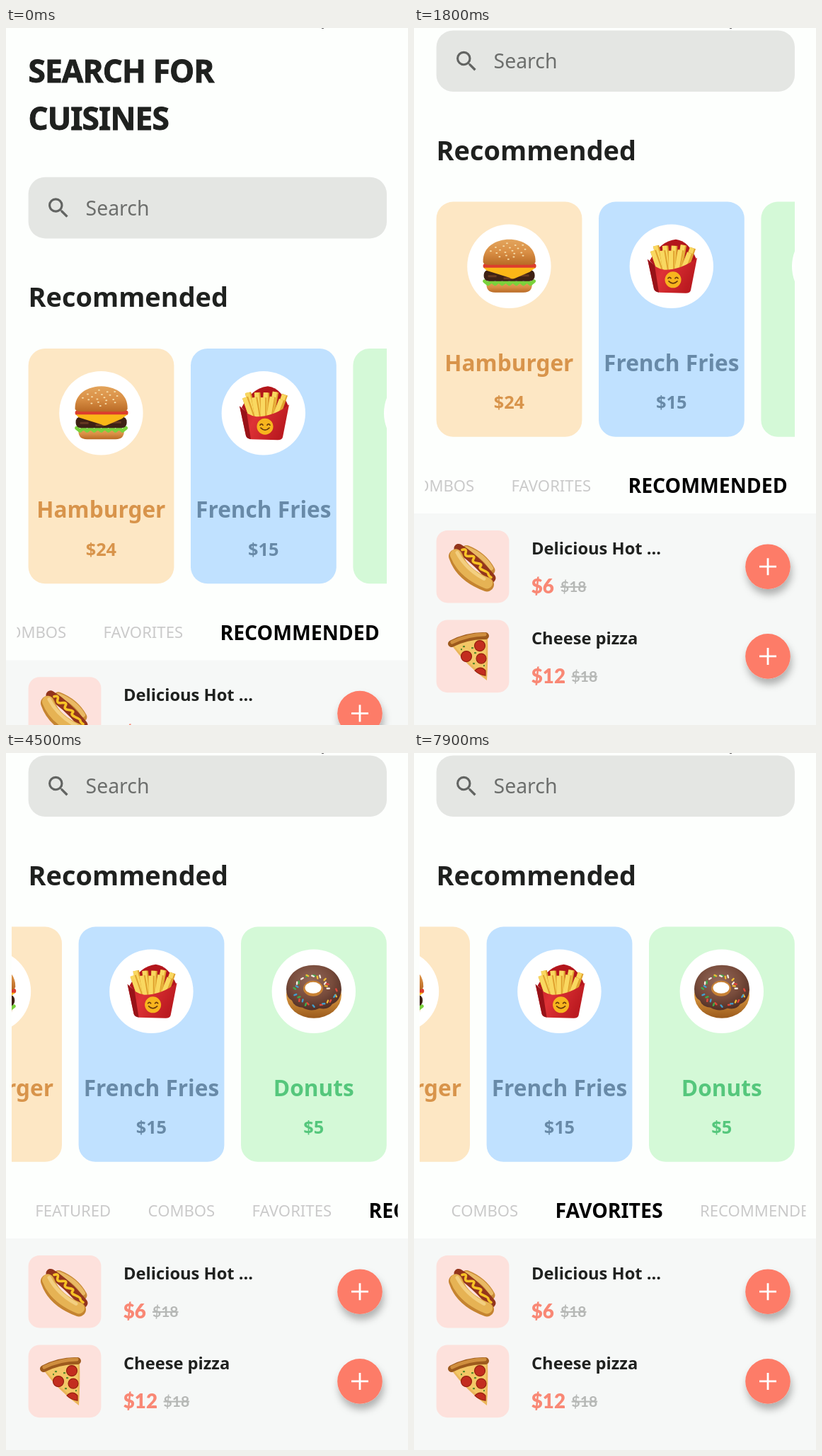
An HTML page that plays this animation: 568 by 985 pixels, repeating every 8000 ms.

```html
<!DOCTYPE html>
<html lang="en">
<head>
<meta charset="utf-8">
<title>Food menu</title>
<style>
  html, body { margin: 0; width: 100%; height: 100%; overflow: hidden; background: #fdfffd; }
  svg { display: block; width: 100%; height: 100%; }
  text { font-family: "Noto Sans", sans-serif; white-space: pre; }
  .bold { font-weight: 700; }
  .title { font-size: 44.2px; letter-spacing: -.85px; stroke: #1f211f; stroke-width: .9px; }
  .price { font-family: Lato, sans-serif; font-weight: 900; }
  .old { font-family: Lato, sans-serif; font-weight: 700; }
</style>
</head>
<body>
<svg id="stage" viewBox="0 0 568 985">
  <defs>
    <clipPath id="cardClip"><rect x="8" y="440" width="530" height="360"/></clipPath>
    <clipPath id="tabClip"><rect x="15.5" y="820" width="538" height="70"/></clipPath>
    <filter id="lift" x="-50%" y="-50%" width="200%" height="200%">
      <feDropShadow dx="2" dy="8" stdDeviation="5.5" flood-color="#000" flood-opacity=".29"/>
    </filter>
    <linearGradient id="bun" x2="0" y2="1">
      <stop offset="0" stop-color="#e3a45c"/><stop offset=".5" stop-color="#d98f45"/><stop offset="1" stop-color="#b96a25"/>
    </linearGradient>
    <linearGradient id="red" x2="1" y2=".4">
      <stop offset="0" stop-color="#c01c22"/><stop offset=".4" stop-color="#de3236"/><stop offset="1" stop-color="#bb1a20"/>
    </linearGradient>
    <radialGradient id="choc" cx=".45" cy=".35" r=".65">
      <stop offset="0" stop-color="#94695b"/><stop offset=".6" stop-color="#774b3b"/><stop offset="1" stop-color="#523026"/>
    </radialGradient>
    <linearGradient id="dough" x2="0" y2="1">
      <stop offset=".5" stop-color="#d9973f"/><stop offset="1" stop-color="#9a5a1c"/>
    </linearGradient>

    <g id="burger">
      <path d="M-32 22H32Q34 37 20 37H-20Q-34 37-32 22Z" fill="url(#bun)"/>
      <path id="lettuce" fill="none" stroke="#7ad23c" stroke-width="5" stroke-linecap="round" stroke-linejoin="round"/>
      <rect x="-36" y="5" width="72" height="16" rx="7" fill="#3e2115"/>
      <path d="M-30 14H-18M-8 17H4M14 13H28" stroke="#663a22" stroke-width="3"/>
      <rect x="-37" y="-4" width="75" height="7" rx="3.5" fill="#dc3d2d"/>
      <path d="M-36 2H37L29 8 8 17Q4 19 0 16L-32 6Z" fill="#fbb717"/>
      <path d="M-37-6C-38-28-18-38 0-38S38-28 37-6Q36-2 28-2H-28Q-36-2-37-6Z" fill="url(#bun)"/>
      <g id="sesame" fill="#f5dca8"/>
    </g>

    <g id="fries">
      <path d="M-31-8Q-16-36 6-38Q24-36 35-10L20 10H-15Z" fill="#b3161c"/>
      <g id="sticks" stroke-width="8.5"/>
      <path d="M-34-10Q-24 3-10 5Q14 5 36-12L27 34Q26 38 20 38L-17 37Q-24 36-25 32Z" fill="url(#red)"/>
      <path d="M-34-10L-24-1-18 37Q-24 36-25 32Z" fill="#981218"/>
      <circle cx="2" cy="19" r="11.5" fill="#f7b51e"/>
      <path d="M-5 17q2-3 4 0M5 17q2-3 4 0M-4 21q6 6 12 0" fill="none" stroke="#6d3b0c" stroke-width="1.7" stroke-linecap="round"/>
    </g>

    <g id="donut">
      <ellipse cy="5" rx="39" ry="33" fill="url(#dough)"/>
      <path d="M-39-3C-38-26-20-37 0-37S39-26 39-2Q37 14 26 18 20 27 8 24-4 30-16 23-28 22-31 13-39 9-39-3Z" fill="url(#choc)"/>
      <ellipse cx="-1" cy="-4" rx="14" ry="11" fill="#c88134"/>
      <ellipse cx="-1" cy="-5" rx="11.5" ry="8" fill="#fff"/>
      <g id="sprinkles" stroke-width="2.4" stroke-linecap="round"/>
    </g>

    <g id="hotdog" stroke-linecap="round" fill="none">
      <path d="M-9-24Q14-15 25 5" stroke="#c98a38" stroke-width="13"/>
      <path d="M-9-26Q15-17 26 2" stroke="#e9b964" stroke-width="6"/>
      <path d="M-20-26Q3-12 26 16" stroke="#93351c" stroke-width="13"/>
      <path d="M-24-15Q-15 12 20 25" stroke="#c58430" stroke-width="20"/>
      <path d="M-24-17Q-14 9 20 23" stroke="#e6b354" stroke-width="16"/>
      <path d="M-22-20Q-10 3 16 17" stroke="#f3cf80" stroke-width="5"/>
      <path d="M-15-24q7-2 5 4t6 5 5 4 5 6 5 4 4 6 7 5 4 5" stroke="#f7c325" stroke-width="3.6"/>
    </g>

    <g id="pizza">
      <path d="M-31-17Q-4-30 21-28Q22 2 20 34Q-8 14-31-17Z" fill="#eab65a"/>
      <path d="M-27-16Q-4-26 19-23L18 28Q-6 11-27-16Z" fill="#f3c766"/>
      <path d="M-30-18Q-6-30 18-29" fill="none" stroke="#9d5a1d" stroke-width="10" stroke-linecap="round"/>
      <path d="M-29-20Q-6-31 17-31" fill="none" stroke="#cf8e3e" stroke-width="5" stroke-linecap="round"/>
      <g fill="#c32d1f" stroke="#96200f" stroke-width="1.2">
        <circle cx="-9" cy="0" r="7.5"/><circle cx="10" cy="-15" r="7.5"/><circle cx="12" cy="3" r="7"/><path d="M3 20q8-8 15 0v7q-9-1-15-7Z"/>
      </g>
      <path d="M-14-14h3M-2-12h3M2-5h3M0 10h3M-17-10h2M15 13h2" stroke="#5c8a2c" stroke-width="2.2"/>
    </g>

    <g id="list"></g>
  </defs>

  <rect width="568" height="985" fill="#fdfffd"/>
  <g id="page">
    <rect y="893.5" width="568" height="400" fill="#f6f8f7"/>
    <g class="bold" fill="#1f211f">
      <text x="31.4" y="76.7" class="title">SEARCH FOR</text>
      <text x="31.4" y="143.7" class="title">CUISINES</text>
      <text x="31.6" y="394.2" font-size="37.9">Recommended</text>
    </g>
    <rect x="31.6" y="210.8" width="506.4" height="86.6" rx="23.7" fill="#e4e6e3"/>
    <path transform="translate(55.3 235.5) scale(1.578)" fill="#626462" d="M15.5 14h-.79l-.28-.27A6.47 6.47 0 0 0 16 9.5 6.5 6.5 0 1 0 9.5 16c1.61 0 3.09-.59 4.23-1.57l.27.28v.79l5 4.99L20.49 19l-4.99-5zm-6 0C7.01 14 5 11.99 5 9.5S7.01 5 9.5 5 14 7.01 14 9.5 11.99 14 9.5 14z"/>
    <text x="112.6" y="264.5" font-size="28.4" fill="#6c6e6c">Search</text>
    <g clip-path="url(#cardClip)"><g id="cards"></g></g>
    <g id="tabs" clip-path="url(#tabClip)"></g>
    <use id="listA" href="#list"/>
    <use id="listB" href="#list"/>
  </g>
  <rect x="446" width="3" height="1" fill="#666"/>
  <rect id="mark" x="514" width="4" height="1" fill="#666"/>
</svg>
<script>
const LOOP = 8000;
const $ = id => document.getElementById(id);
const clamp = v => Math.min(1, Math.max(0, v));
const mix = (a, b, u) => a + (b - a) * u;
const smooth = u => u * u * (3 - 2 * u);
const span = (t, start, end) => smooth(clamp((t - start) / (end - start)));
const repeat = (n, fn) => Array.from({ length: n }, (_, i) => fn(i)).join('');

// CSS "ease" curve, solved by bisection
function ease(u) {
  const bez = (s, a, b) => 3 * s * (1 - s) ** 2 * a + 3 * s * s * (1 - s) * b + s ** 3;
  let lo = 0, hi = 1;
  for (let i = 0; i < 20; i++) {
    const mid = (lo + hi) / 2;
    if (bez(mid, .25, .25) < u) lo = mid; else hi = mid;
  }
  return bez(lo, .1, 1);
}

// Food details
$('lettuce').setAttribute('d', 'M-35 21' + repeat(14, i => `l5 ${i % 2 ? -4 : 4}`));
$('sesame').innerHTML = repeat(20, i => {
  const a = i * 2.4, r = Math.sqrt((i + .5) / 20);
  return `<ellipse cx="${r * 28 * Math.cos(a)}" cy="${-22 + r * 12 * Math.sin(a)}" rx="1.5" ry="1"/>`;
});
$('sticks').innerHTML = repeat(10, i => {
  const back = i < 5, k = i % 5 - 2;
  const x = k * 13 + (back ? 4 : 0), top = (back ? -33 : -26) + Math.abs(k) * 2 + i * 7 % 5;
  return `<path d="M${x} ${top}L${x * .6} 8" stroke="#e0a32f"/>` +
    `<path d="M${x - 1} ${top}L${x * .6 - 1} 8" stroke="#f9d860" stroke-width="6.3"/>`;
});
const candy = ['#f3e9dd', '#e2483b', '#3fae4c', '#f0bc34', '#3f9fce'];
$('sprinkles').innerHTML = repeat(30, i => {
  const a = i * 2.4, r = .52 + .4 * (i * .618 % 1), turn = i * 1.7;
  return `<path d="M${r * 36 * Math.cos(a)} ${-4 + r * 29 * Math.sin(a)}l${3 * Math.cos(turn)} ${3 * Math.sin(turn)}" stroke="${candy[i % 5]}"/>`;
});

// Cards
const foods = [
  ['Hamburger', '$24', 'burger', '#fde7c4', '#d8944b'],
  ['French Fries', '$15', 'fries', '#c0e1ff', '#688aa8'],
  ['Donuts', '$5', 'donut', '#d4f9d7', '#55c77c']
];
$('cards').innerHTML = foods.map(([name, price, icon, bg, ink], i) => `
  <g transform="translate(${31.6 + i * 229.4} 453)" text-anchor="middle" class="bold" fill="${ink}">
    <rect width="205.8" height="332.2" rx="23.7" fill="${bg}"/>
    <circle cx="102.8" cy="91.2" r="59.2" fill="#fff"/>
    <use href="#${icon}" x="103" y="91.2"/>
    <text x="102.8" y="239.3" font-size="31.6">${name}</text>
    <text x="102.8" y="292.6" font-size="25.3">${price}</text>
  </g>`).join('');

// List rows
const rows = [
  ['Delicious Hot ...', '$6', 'hotdog', 207],
  ['Cheese pizza', '$12', 'pizza', 222.6]
];
$('list').innerHTML = rows.map(([name, price, icon, oldX], i) => `
  <g transform="translate(0 ${917.3 + i * 126.7})">
    <rect x="31.6" width="102.8" height="102.6" rx="15.8" fill="#fde1dc"/>
    <use href="#${icon}" x="83" y="51.5"/>
    <text x="166" y="34" font-size="23.7" class="bold" fill="#1f211f">${name}</text>
    <text x="165.8" y="89.5" font-size="27.7" class="price" fill="#f98875">${price}</text>
    <text x="${oldX}" y="87" font-size="21" class="old" fill="#b6b8b6" text-decoration="line-through">$18</text>
    <circle cx="500" cy="51.3" r="31.8" fill="#fd7c68" filter="url(#lift)"/>
    <path d="M488 51.3H512M500 39.3V63.3" stroke="#fff" stroke-width="2.8"/>
  </g>`).join('');

// Tabs
$('tabs').innerHTML = ['FEATURED', 'COMBOS', 'FAVORITES', 'RECOMMENDED'].map(s => `<text>${s}</text>`).join('');
const labels = [...$('tabs').children];

const taps = [
  { at: 5340, from: 3, to: 0, scroll: 0 },
  { at: 6260, from: 0, to: 1, scroll: .8 },
  { at: 6960, from: 1, to: 2, scroll: 148 }
];

function drawTabs(t) {
  const tap = taps.filter(p => t >= p.at).pop();
  const u = tap ? ease(clamp((t - tap.at) / 300)) : 1;
  const from = tap ? tap.from : 3, to = tap ? tap.to : 3;
  let scroll = 210 * (1 - span(t, 3870, 4400));
  if (tap) scroll = mix(tap.to === 2 ? .8 : 0, tap.scroll, u);

  let x = 41.3 - scroll;
  labels.forEach((el, i) => {
    const on = i === to ? u : i === from ? 1 - u : 0;
    const size = mix(22.1, 28.4, on), grey = Math.round(mix(202, 0, on));
    el.setAttribute('font-size', size);
    el.setAttribute('font-weight', on > .5 ? 700 : 400);
    el.setAttribute('fill', `rgb(${grey},${grey},${grey})`);
    el.setAttribute('x', x);
    el.setAttribute('y', 853.8 + .388 * size);
    x += el.getComputedTextLength() + 52.4;
  });

  // The old list leaves while the same list enters from the other side
  const dir = to < from ? 1 : -1;
  $('listA').setAttribute('x', dir * 568 * (u - 1));
  $('listB').setAttribute('x', dir * 568 * u);
  $('listB').setAttribute('visibility', u < 1 ? 'visible' : 'hidden');
}

function draw(t) {
  $('page').setAttribute('transform', `translate(0 ${-207.4 * span(t, 40, 480)})`);
  $('cards').setAttribute('transform', `translate(${-158.4 * span(t, 1900, 2606)})`);
  $('mark').setAttribute('visibility', t >= 100 && t < 1000 ? 'visible' : 'hidden');
  drawTabs(t);
}

function tick() {
  draw(performance.now() % LOOP);
  requestAnimationFrame(tick);
}
tick();
</script>
</body>
</html>
```
